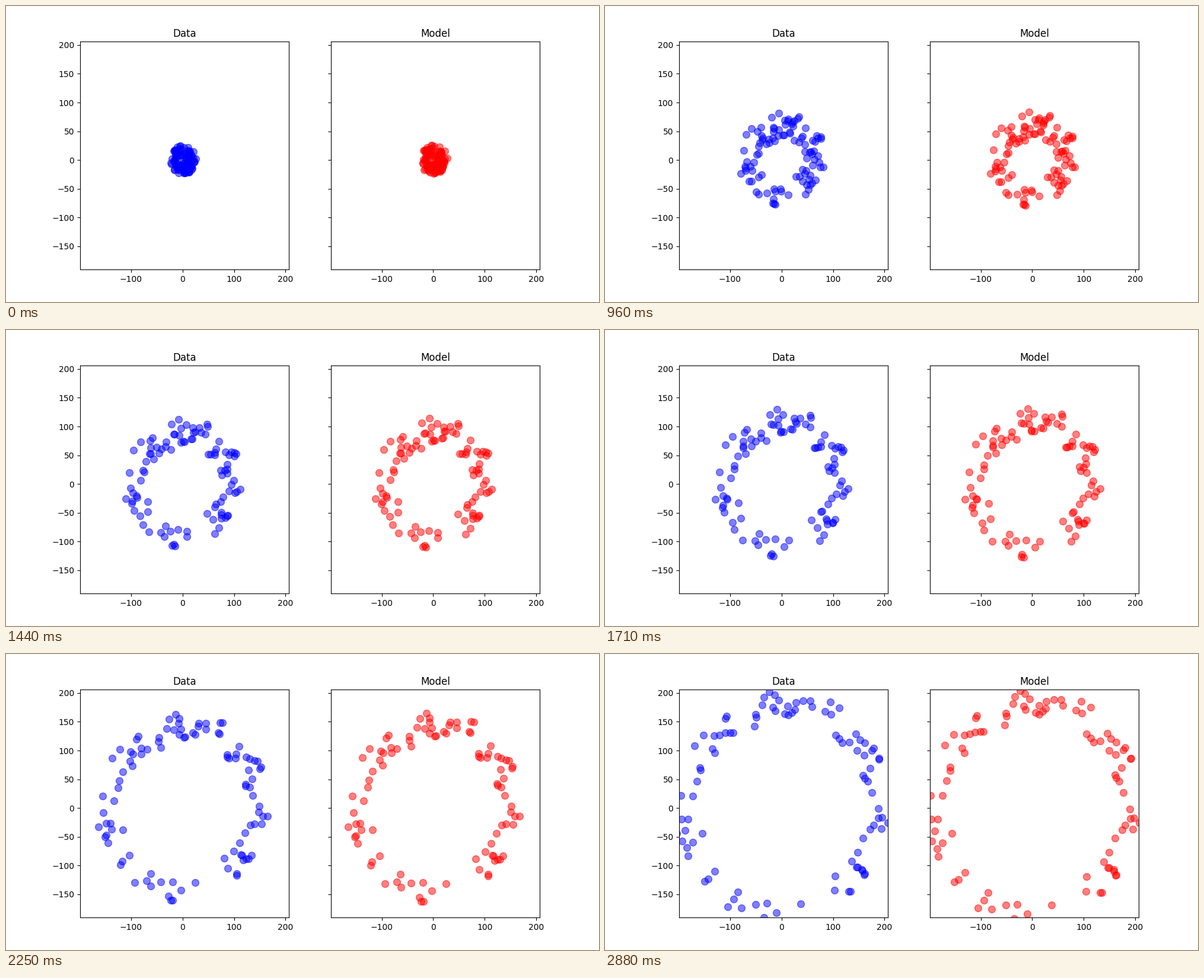
Write a matplotlib script that moves like this. It is 1000x500 px and loops after 2910 ms.

```python
import numpy as np
import matplotlib.pyplot as plt
from matplotlib.animation import FuncAnimation

FRAMES, STEP = 97, 30
BLOB = 25                                              # radius of the starting disc
CROWD = [9, 13, 10, 9, 11, 5, 9, 7, 6, 1, 10, 10]      # particles heading into each 30 degree sector
COUNT = sum(CROWD)

rng = np.random.default_rng(4)

# starting places: an even disc
r0 = BLOB * np.sqrt(rng.uniform(0, 1, COUNT))
a0 = rng.uniform(0, 2 * np.pi, COUNT)
x0, y0 = 1 + r0 * np.cos(a0), 1 + r0 * np.sin(a0)

# headings: random inside each sector
sector = np.repeat(np.arange(len(CROWD)), CROWD)
heading = (sector + rng.uniform(0, 1, COUNT)) * 2 * np.pi / len(CROWD)
speed = rng.uniform(1.82, 2.0, COUNT)
sway = rng.normal(0, 0.04, COUNT)
rate = rng.uniform(0.04, 0.08, COUNT)
phase = rng.uniform(0, 2 * np.pi, COUNT)


def positions(t):
    """Particles run outwards while their headings wander a little."""
    a = heading + sway * np.sin(phase + rate * t)
    return x0 + speed * t * np.cos(a), y0 + speed * t * np.sin(a)


fig, axes = plt.subplots(1, 2, figsize=(10, 5), dpi=100, sharex=True, sharey=True)
clouds = []
for ax, title, color in zip(axes, ("Data", "Model"), ("blue", "red")):
    ax.set_title(title)
    clouds += ax.plot([], [], "o", color=color, alpha=0.5, markersize=8.5)
axes[0].set_xlim(-198.9, 206.7)
axes[0].set_ylim(-190.23, 206.07)


def draw(i):
    # the model runs one step ahead of the data
    for ahead, cloud in enumerate(clouds):
        cloud.set_data(*positions(i + ahead))
    return clouds


anim = FuncAnimation(fig, draw, frames=FRAMES, interval=STEP, repeat=True,
                     repeat_delay=0, blit=False)
plt.show()
```
